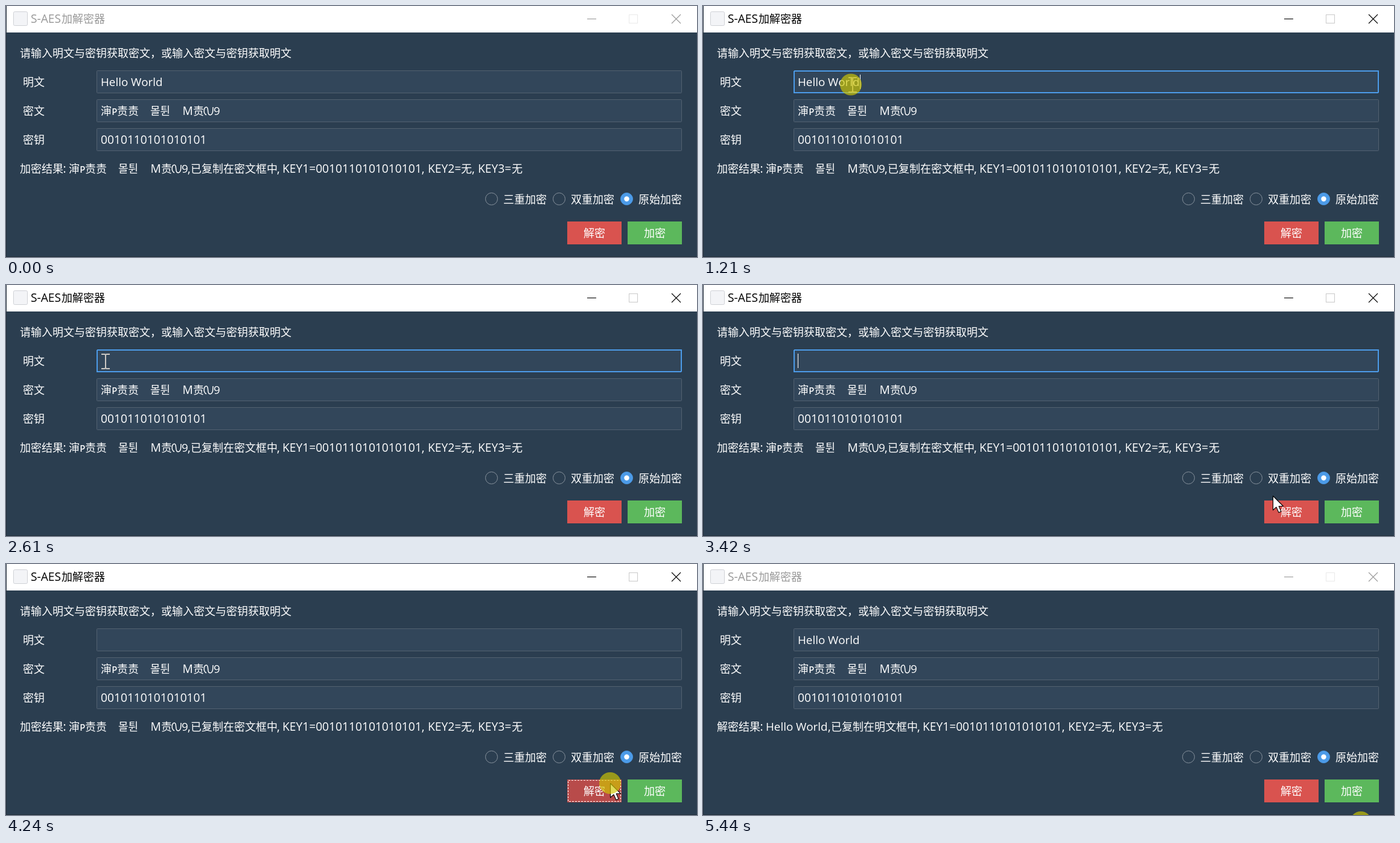
Recreate the animation shown at these times as an HTML page. Size 1145 by 417 pixels, loop 5510 ms.

```html
<!DOCTYPE html>
<html lang="zh-CN">
<head>
<meta charset="utf-8">
<title>S-AES加解密器</title>
<style>
  html, body { margin: 0; width: 100%; height: 100%; overflow: hidden; background: #2b3e50; }
  svg { display: block; width: 1145px; height: 417px; }
  text { white-space: pre; fill: #fff; font: 18px "Noto Sans CJK SC", "Noto Sans CJK", sans-serif; }
  .latin { font: 19.2px "Open Sans", "Noto Sans", sans-serif; }
  .name { font-size: 18.8px; }
  .crisp { shape-rendering: crispEdges; }
</style>
</head>
<body>
<svg id="stage" viewBox="0 0 1145 417">
  <rect width="1145" height="417" fill="#2b3e50"/>
  <rect width="1145" height="44" fill="#fff"/>
  <rect width="1" height="417" fill="#202d39"/>
  <rect y="416" width="1145" height="1" fill="#212e3a"/>
  <rect x="12.5" y="9.5" width="23" height="23" rx="2" fill="#f3f4f7" stroke="#cfd1d6"/>
  <g id="title"></g>
  <g fill="none" stroke-width="1.1">
    <path id="minimise" d="M963 21.5H978"/>
    <rect id="maximise" x="1032.5" y="14.5" width="14" height="14"/>
    <path id="close" d="M1103 14L1118 29M1118 14L1103 29"/>
  </g>
  <g id="form"></g>
  <rect id="focus" class="crisp" x="151" y="108" width="968" height="36" rx="1" fill="none" stroke="#4c9be8" stroke-width="2"/>
  <rect id="hover" x="150.5" y="107.5" width="969" height="37" rx="1" fill="none" stroke="#4c9be8"/>
  <rect id="selection" x="157" y="114" width="103" height="24" fill="#526170"/>
  <g id="plain"></g>
  <rect id="caret" y="114" width="1" height="24" fill="#fff"/>
  <g id="encrypted"></g>
  <g id="decrypted"></g>
  <g id="tail"></g>
  <g id="buttons"></g>
  <rect id="ring" class="crisp" x="931.5" y="359.5" width="87" height="35" fill="none" stroke="#fff" stroke-dasharray="3 2"/>
  <path id="beam" d="M-7 -12H-2Q0 -12 0 -10Q0 -12 2 -12H7M0 -10V10M-7 12H-2Q0 12 0 10Q0 12 2 12H7" fill="none" stroke="#cbc8c4" stroke-width="2"/>
  <path id="arrow" d="M.5 .5V24L6 19L10 28L14 26.3L10.2 17.5H17.5Z" fill="#fff" stroke="#000" stroke-width="1.1" stroke-linejoin="round"/>
  <circle id="click" r="18" fill="#d0c800" fill-opacity=".66"/>
</svg>
<script>
const NS = 'http://www.w3.org/2000/svg';
const LOOP = 5510;
const KEY = '0010110101010101';
const $ = id => document.getElementById(id);

function add(parent, tag, attrs, content = '') {
  const el = document.createElementNS(NS, tag);
  for (const k in attrs) el.setAttribute(k, attrs[k]);
  el.textContent = content;
  parent.append(el);
  return el;
}
const cjk = (parent, x, y, s) => add(parent, 'text', { x, y }, s);
const latin = (parent, x, y, s, cls = '') => add(parent, 'text', { x, y, class: 'latin ' + cls }, s);

function cipher(parent, x, y) {
  cjk(parent, x, y, '渖');
  latin(parent, x + 18, y, 'ᴘ');
  cjk(parent, x + 27, y, '责责');
  cjk(parent, x + 82, y, '몰튄');
  latin(parent, x + 135.5, y, 'M');
  cjk(parent, x + 153, y, '责');
  add(parent, 'path', {
    d: 'M175 0C169 -3 171 -13 175 -13C180 -13 175 0 181 0C185 0 186 -4 186 -13',
    transform: `translate(${x} ${y})`, fill: 'none', stroke: '#fff', 'stroke-width': 1.5
  });
  latin(parent, x + 187, y, '9', 'name');
}

function build() {
  latin($('title'), 41, 28, 'S-AES');
  cjk($('title'), 92, 28, '加解密器');

  const form = $('form');
  cjk(form, 23, 85, '请输入明文与密钥获取密文，或输入密文与密钥获取明文');
  ['明文', '密文', '密钥'].forEach((label, i) => {
    const y = 107 + i * 48;
    cjk(form, 28, y + 26, label);
    add(form, 'rect', { x: 150.5, y: y + .5, width: 969, height: 37, rx: 1, fill: '#32465a', stroke: '#526170' });
  });
  cipher(form, 157, 181);
  latin(form, 157, 229, KEY);
  ['三重加密', '双重加密', '原始加密'].forEach((label, i) => {
    const x = 804.5 + i * 112, on = i === 2;
    add(form, 'circle', { cx: x, cy: 320.5, r: 10, fill: on ? '#4c9be8' : 'none', stroke: on ? '#4c9be8' : '#87929d' });
    if (on) add(form, 'circle', { cx: x, cy: 320.5, r: 4.2, fill: '#fff' });
    cjk(form, x + 19.5, 328, label);
  });

  latin($('plain'), 157, 133, 'Hello World', 'name');

  cjk($('encrypted'), 23, 277, '加密结果');
  cipher($('encrypted'), 104, 277);
  cjk($('decrypted'), 23, 277, '解密结果');
  latin($('decrypted'), 104, 277, 'Hello World', 'name');
  latin(form, 94.5, 277, ':');

  const tail = $('tail');
  latin(tail, 301, 277, ',');
  cjk(tail, 306, 277, '已复制在密文框中').id = 'copied';
  latin(tail, 449, 277, ',');
  latin(tail, 458, 277, 'KEY1=' + KEY + ',');
  latin(tail, 699, 277, 'KEY2=');
  cjk(tail, 754, 277, '无');
  latin(tail, 772, 277, ',');
  latin(tail, 782, 277, 'KEY3=');
  cjk(tail, 838, 277, '无');

  [['解密', '#d9534f'], ['加密', '#5cb85c']].forEach(([label, fill], i) => {
    const x = 930 + i * 100;
    add($('buttons'), 'rect', { x, y: 358, width: 90, height: 38, fill, id: 'button' + i });
    cjk($('buttons'), x + 27, 384, label);
  });
}

// Pointer steps: start time, shape, x, y
const pointer = [
  [0, ''],
  [460, 'beam', 1106, 205], [530, 'beam', 711, 136], [600, 'beam', 633, 124],
  [670, 'beam', 600, 114], [740, 'beam', 566, 111], [870, 'beam', 565, 118],
  [940, 'beam', 565, 128], [1140, 'beam', 503, 131], [1210, 'beam', 248, 131],
  [1280, 'beam', 165, 127],
  [2810, 'beam', 236, 135], [2880, 'arrow', 500, 214], [2940, 'arrow', 783, 297],
  [3140, 'arrow', 900, 345], [3210, 'arrow', 1086, 392], [3280, 'arrow', 1040, 384],
  [3350, 'arrow', 984, 368], [3420, 'arrow', 944, 350], [3490, 'arrow', 956, 355],
  [3560, 'arrow', 985, 366], [3630, 'arrow', 1010, 374], [3700, 'arrow', 1024, 373],
  [3770, 'arrow', 1008, 367], [3840, 'arrow', 1001, 364],
  [4580, 'arrow', 1024, 398], [4650, '']
];

function update(t) {
  const within = (a, b) => t >= a && t < b;
  const show = (id, on) => $(id).style.display = on ? '' : 'none';
  const active = within(1070, 5440);
  const done = t >= 4310;

  $('title').querySelectorAll('text').forEach(el => el.style.fill = active ? '#000' : '#999');
  for (const id of ['minimise', 'close']) $(id).setAttribute('stroke', active ? '#000' : '#999');
  $('maximise').setAttribute('stroke', active ? '#ccc' : '#ebebeb');

  show('hover', within(530, 1070));
  show('focus', within(1070, 4240));
  show('selection', within(1280, 2210));
  show('plain', t < 2210 || done);
  show('caret', within(1070, 1680) || within(2010, 2610) || within(2940, 3490) || within(3770, 4240));
  $('caret').setAttribute('x', t < 1280 ? 260 : 157);

  show('encrypted', !done);
  show('decrypted', done);
  $('tail').setAttribute('transform', `translate(${done ? -94 : 0})`);
  $('copied').textContent = done ? '已复制在明文框中' : '已复制在密文框中';

  show('ring', within(4240, 5440));
  $('button0').setAttribute('fill', within(4240, 4310) ? '#b84b4a' : '#d9534f');

  const [, shape, x, y] = pointer.findLast(p => p[0] <= t);
  for (const id of ['beam', 'arrow']) {
    show(id, id === shape);
    if (id === shape) $(id).setAttribute('transform', `translate(${x} ${y})`);
  }

  const outside = t >= 5440;
  show('click', within(1070, 1610) || within(4240, 4310) || outside);
  $('click').setAttribute('cx', outside ? 1090 : shape === 'beam' ? x - 3 : x);
  $('click').setAttribute('cy', outside ? 429 : shape === 'beam' ? y - .5 : y);
}

build();
const start = performance.now();
function tick() {
  update((performance.now() - start) % LOOP);
  requestAnimationFrame(tick);
}
tick();
</script>
</body>
</html>
```
